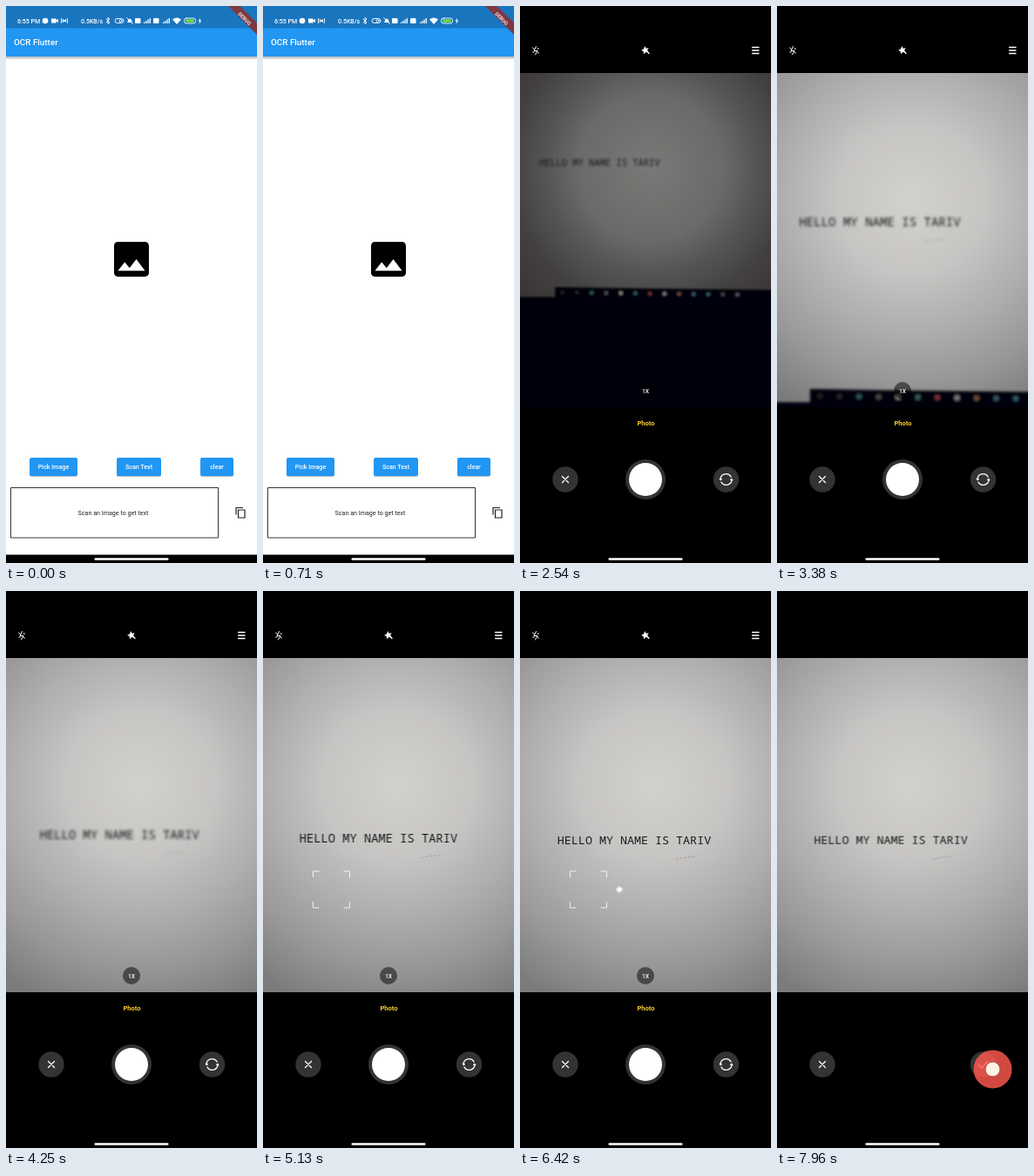
An HTML page for the animation above (8000 ms loop, 288 by 640 pixels).

```html
<!DOCTYPE html>
<html lang="en">
<head>
<meta charset="utf-8">
<title>Text scanner demo</title>
<style>
  html, body { margin: 0; width: 100%; height: 100%; overflow: hidden; background: #000; }
  svg { display: block; width: 100%; height: 100%; font-family: Roboto, sans-serif; }
  .line { fill: none; stroke: #fff; stroke-linecap: round; stroke-linejoin: round; }
  .mid { text-anchor: middle; }
  .button text { font-size: 7.1px; font-weight: 500; fill: #fff; }
  .mono { font: 10px "Noto Sans Mono", monospace; }
</style>
</head>
<body>
<svg viewBox="0 0 288 640" preserveAspectRatio="none">
  <defs>
    <linearGradient id="shadow" x2="0" y2="1">
      <stop stop-color="#555" stop-opacity=".45"/><stop offset="1" stop-color="#555" stop-opacity="0"/>
    </linearGradient>
    <radialGradient id="bright" gradientUnits="userSpaceOnUse" cx="154" cy="222" r="270">
      <stop stop-color="#d2d1ce"/><stop offset=".32" stop-color="#c7c5c3"/>
      <stop offset=".55" stop-color="#b0aeae"/><stop offset=".78" stop-color="#989697"/>
      <stop offset="1" stop-color="#7b7b7d"/>
    </radialGradient>
    <radialGradient id="dim" gradientUnits="userSpaceOnUse" cx="150" cy="186" r="230">
      <stop stop-color="#7b7977"/><stop offset=".36" stop-color="#6c6a69"/>
      <stop offset=".52" stop-color="#565455"/><stop offset=".7" stop-color="#434140"/>
      <stop offset="1" stop-color="#332f2e"/>
    </radialGradient>
    <clipPath id="finder"><path d="M0 77H288V461H0Z"/></clipPath>
    <filter id="blur" filterUnits="userSpaceOnUse" x="-200" y="-40" width="500" height="420">
      <feGaussianBlur id="blurAmount" stdDeviation="0"/>
    </filter>
  </defs>

  <g id="home">
    <path fill="#fff" d="M0 0H288V640H0Z"/>
    <path fill="url(#shadow)" d="M0 58H288V62H0Z"/>
    <path fill="#2196f3" d="M0 0H288V58H0Z"/>
    <path fill="#1a75bf" d="M0 0H288V25.500H0Z"/>
    <g fill="#fff" font-size="7" font-weight="500">
      <text x="13" y="19.700">6:55 PM</text>
      <text x="86" y="19.700">0.5KB/s</text>
      <circle cx="45" cy="17" r="3.300"/>
      <path d="M52 14.500h5.500v2l2.500-1.700v4.500l-2.500-1.700v2H52z"/>
      <path d="M158 20v-1.500h1.300V20zm2.200 0v-3h1.300v3zm2.200 0v-4.500h1.300V20zm2.200 0v-6h1.300v6z"/>
      <path d="M180 20v-1.500h1.300V20zm2.200 0v-3h1.300v3zm2.200 0v-4.500h1.300V20zm2.200 0v-6h1.300v6z"/>
      <rect x="148" y="14" width="6.500" height="6" rx="1"/>
      <rect x="169" y="14" width="6.500" height="6" rx="1"/>
      <path d="M191 15.500q5-4 10 0l-5 5.500z"/>
      <path d="M223 13.500l-2.500 4h1.800l-.8 3.500 2.800-4.500h-1.800z"/>
      <path d="M139 19q1-1 1-3 2-3 4 0 0 2 1 3z"/>
    </g>
    <g class="line" stroke-width=".9">
      <path d="M63.500 14.500v5M70.500 14.500v5M65.500 15.500l3 3v-3l-3 3z"/>
      <path d="M115 15l4 4-2 1.700v-7.400l2 1.700-4 4"/>
      <rect x="125" y="14.500" width="10" height="5" rx="2.500"/><circle cx="131.500" cy="17" r="1.500"/>
      <path d="M138.500 13.500l7 7"/>
      <rect x="204.500" y="14" width="13" height="6" rx="2.500"/>
    </g>
    <rect x="206" y="15.300" width="10" height="3.500" rx="1.500" fill="#6fdc3a"/>
    <path fill="#7e3842" d="M255 0H268.500L288 19.500V33Z"/>
    <text class="mid" transform="translate(273.200 15)rotate(45)" y="1.300" font-size="5.800" font-weight="700" fill="#f2e4e2">DEBUG</text>
    <text x="9" y="45.300" font-size="9.900" font-weight="500" fill="#fff">OCR Flutter</text>
    <path transform="translate(117.300 264.300)scale(2.222)" d="M21 19V5c0-1.100-.9-2-2-2H5c-1.100 0-2 .9-2 2v14c0 1.100.9 2 2 2h14c1.100 0 2-.9 2-2zM8.500 13.500l2.500 3 3.500-4.500 4.500 6H5z"/>
    <g id="buttons"></g>
    <rect id="pressed" x="27" y="519" width="55" height="21" rx="2" fill="#d8d8d8"/>
    <path fill="none" stroke="#333" d="M5.500 553.500H243.500V611H5.500Z"/>
    <text class="mid" x="123" y="584.500" font-size="7.150" fill="#222">Scan an Image to get text</text>
    <path fill="none" stroke="#222" stroke-width="1.200" d="M264 584.500V576.500H272M266.500 579H274V588H266.500Z"/>
    <path d="M0 630.500H288V640H0Z"/>
  </g>

  <g id="camera">
    <path d="M0 0H288V640H0Z"/>
    <g id="preview" clip-path="url(#finder)">
      <path fill="url(#bright)" d="M0 77H288V461H0Z"/>
      <path id="dimLight" fill="url(#dim)" d="M0 77H288V461H0Z"/>
      <g id="scene" filter="url(#blur)">
        <g id="bezel">
          <path fill="#060607" d="M-150 10.500H0V0L300 3.600V200H-150Z"/>
          <g id="lights"></g>
        </g>
        <path d="M36 16.500l7-1.500 10-.8" fill="none" stroke="#666" stroke-opacity=".3" stroke-dasharray="2 1.500"/>
        <text id="words" class="mono mid" y="3.600" fill="#1c1c1c">HELLO MY NAME IS TARIV</text>
      </g>
    </g>
    <g id="controls">
      <g class="line" stroke-width="1.300">
        <path d="M266.500 47.500h7.500m-7.500 3.500h7.500m-7.500 3.500h7.500"/>
        <path d="M18.500 46.500l-2.500 5h4l-2.500 4.500M14.500 48l2 1.500M19.500 52.500l2 1.500M14.800 53h1.500M20 49h1.500" stroke-width="1"/>
        <path d="M145 51l3 3.500"/>
      </g>
      <path fill="#fff" d="M143.300 46l1.200 2.800 3.200-.5-1.700 2.600 1.500 2.700-3.200-.5-2.200 2.100-.4-3-2.600-1.500 2.800-1.300z"/>
      <circle cx="144" cy="442" r="10" fill="#000" fill-opacity=".5"/>
      <text class="mid" x="144" y="444.500" font-size="6.800" font-weight="500" fill="#fff">1X</text>
      <text class="mid" x="144.500" y="481.600" font-size="7.600" font-weight="700" fill="#f8cd2c">Photo</text>
      <circle cx="144" cy="544" r="23" fill="#333"/>
      <circle id="shutter" cx="144" cy="544" r="19" fill="#fff"/>
    </g>
    <g id="focus" class="line" stroke-width="1">
      <path d="M57.500 329v-7h7m28 0h7v7m0 28v7h-7m-28 0h-7v-7" stroke-linecap="butt" stroke-opacity=".85"/>
      <g id="sun"><circle cx="114" cy="343" r="2.200" fill="#fff"/>
        <circle cx="114" cy="343" r="3.400" stroke-width=".9" stroke-dasharray=".9 1.770"/></g>
    </g>
    <circle cx="52" cy="544" r="14.700" fill="#333"/>
    <circle cx="236.500" cy="544" r="14.700" fill="#333"/>
    <g class="line" stroke-width="1.300">
      <path d="M48.500 540.500l7 7m0-7l-7 7"/>
      <path id="swap" d="M230.100 544.500a6.400 6.400 0 0 1 12-3.500M242.900 543.500a6.400 6.400 0 0 1-12 3.500M229.300 543.300l.8 1.200 1.200-.8M243.700 544.700l-.8-1.200-1.200.8"/>
      <path id="check" d="M231 544l3.700 4 7-7.500"/>
    </g>
  </g>

  <rect id="pill" x="101.500" y="634.300" width="85" height="2.400" rx="1.200" fill="#fff"/>
  <g id="touch">
    <circle id="halo" fill="none" stroke="#ff5a50" stroke-opacity=".82"/>
    <circle r="8" fill="#fff4e6"/>
  </g>
</svg>
<script>
const $ = id => document.getElementById(id);
const LOOP = 8000;

$('buttons').innerHTML = [['Pick Image', 27, 55], ['Scan Text', 127, 51], ['clear', 223, 38]].map(([label, x, w]) =>
  `<g class="button"><rect x="${x}" y="520" width="${w}" height="21" rx="2" fill="#777" opacity=".45"/>
   <rect x="${x}" y="519" width="${w}" height="21" rx="2" fill="#2196f3"/>
   <text class="mid" x="${x + w / 2}" y="532">${label}</text></g>`).join('');

$('lights').innerHTML = ['#22262c', '#2a2a30', '#2f6a6a', '#5b5b60', '#a8a49c', '#3a7468', '#8e4040',
  '#98989c', '#8a5f48', '#3f6f85', '#396f86', '#55555c', '#6c6c74'].map((color, i) =>
  `<circle cx="${8 + i * 16}" cy="${5.5 + i * .2}" r="2.200" fill="${color}" opacity=".8"/>`).join('');

// Rows are [time, ...values]; values ease between neighbouring rows.
function track(rows, t) {
  const next = rows.findIndex(row => row[0] > t);
  if (next === 0) return rows[0].slice(1);
  if (next < 0) return rows[rows.length - 1].slice(1);
  const a = rows[next - 1], b = rows[next];
  const p = (t - a[0]) / (b[0] - a[0]), e = p * p * (3 - 2 * p);
  return a.slice(1).map((v, i) => v + (b[i + 1] - v) * e);
}

const pose = [ // centre x, centre y, scale, bezel x
  [2540, 91.5, 180, 1.046, -49], [3380, 118, 248, 1.405, -57], [4200, 130, 280, 1.39, -57],
  [5130, 132.3, 284, 1.375, -57], [6420, 131, 286, 1.337, -57], [7000, 130.5, 286, 1.337, -57]];
const cameraFade = [[1820, 0], [2000, 1]];
const previewFade = [[2180, 0], [2380, 1]];
const dimness = [[2560, 1], [2960, 0]];
const softness = [[4500, 1.1], [4800, 0]];
const taps = [ // x, y, down, up
  [57, 537, 1430, 1560], [78, 343, 4380, 4500], [144, 544, 6730, 6850], [247.5, 549.5, 7840, 8000]];
const REVIEW = 7000;

const show = (id, on) => $(id).setAttribute('opacity', +on);
const clamp = v => Math.max(0, Math.min(1, v));

function drawTouch(t) {
  const tap = taps.find(([, , down, up]) => t >= down && t < up + 200);
  show('touch', false);
  if (!tap) return;
  const [x, y, down, up] = tap;
  const leaving = clamp((t - up) / 200);
  const radius = 16 + 6 * clamp((t - down) / 100) + 6 * leaving;
  $('touch').setAttribute('transform', `translate(${x} ${y})`);
  $('halo').setAttribute('r', (radius + 8) / 2);
  $('halo').setAttribute('stroke-width', radius - 8);
  show('touch', clamp((t - down) / 100) * (1 - leaving));
}

function draw(t) {
  const review = t >= REVIEW;
  const [x, y, scale, bezelX] = track(pose, t);
  const [dim] = track(dimness, t), [soft] = track(softness, t);
  show('camera', track(cameraFade, t)[0]);
  show('preview', track(previewFade, t)[0]);
  show('dimLight', dim);
  $('scene').setAttribute('transform', `translate(${x} ${y})scale(${scale})`);
  $('bezel').setAttribute('transform', `translate(${bezelX} 137)`);
  $('blurAmount').setAttribute('stdDeviation', soft);
  $('words').setAttribute('font-weight', soft > .3 ? 700 : 400);
  show('controls', !review);
  show('swap', !review);
  show('check', review);
  show('focus', t >= 4500 && !review);
  show('sun', t >= 5400);
  $('shutter').setAttribute('r', t > 6750 && t < 6880 ? 17 : 19);
  show('pressed', .45 * clamp((t - 1430) / 130));
  drawTouch(t);
}

const start = performance.now();
function tick() {
  draw((performance.now() - start) % LOOP);
  requestAnimationFrame(tick);
}
tick();
</script>
</body>
</html>
```
